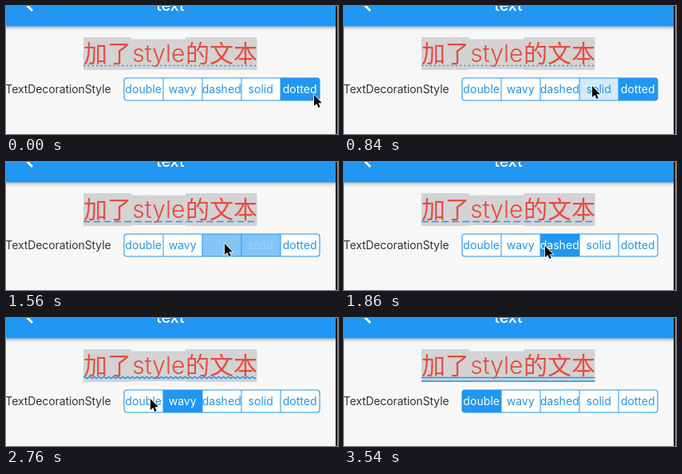
These frames come from a looping animation (416x160 px, 3600 ms). An HTML page:

```html
<!DOCTYPE html>
<html lang="en">
<head>
<meta charset="utf-8">
<title>Text decoration styles</title>
<style>
html, body { margin: 0; width: 100%; height: 100%; overflow: hidden; background: #f7f7f7; }
svg { display: block; width: 416px; height: 160px; font-family: Inter, Roboto, sans-serif; }
.sample { font: 350 30px Inter, "Noto Sans CJK SC", "Noto Sans CJK", sans-serif; fill: #ea4a3f; }
.cjk { font-family: "Noto Sans CJK SC", "Noto Sans CJK", sans-serif; }
.small { font-size: 14px; letter-spacing: .05px; }
.line { fill: none; stroke: #2196f3; stroke-width: 1.5; }
</style>
</head>
<body>
<svg viewBox="0 0 416 160">
  <defs>
    <linearGradient id="shade" x2="0" y2="1">
      <stop offset="0" stop-color="#000" stop-opacity=".3"/>
      <stop offset=".4" stop-color="#000" stop-opacity=".1"/>
      <stop offset="1" stop-color="#000" stop-opacity="0"/>
    </linearGradient>
    <clipPath id="pill"><rect x="148" y="90" width="245" height="28" rx="3.5"/></clipPath>
  </defs>
  <rect width="416" height="160" fill="#f7f7f7"/>
  <rect y="25.5" width="413" height="6" fill="url(#shade)"/>
  <rect width="413" height="25.5" fill="#2196f3"/>
  <path d="M33 6 L23 -4 L33 -14" fill="none" stroke="#fff" stroke-width="2.8"/>
  <text x="206" y="6" text-anchor="middle" font-size="19.5" font-weight="500" fill="#fff">text</text>

  <path d="M97 39H157V41.5H225V39H314.5V80H225V79H157V80H97Z" fill="#d3d3d3"/>
  <g class="sample">
    <text class="cjk" x="97" y="70">加了</text>
    <text x="191.3" y="70" text-anchor="middle">style</text>
    <text class="cjk" x="225" y="70">的文本</text>
  </g>
  <g id="lines" class="line"></g>

  <text x="131.5" y="109" text-anchor="end" font-size="14" letter-spacing="-.1" fill="#333">TextDecorationStyle</text>
  <g id="cells" clip-path="url(#pill)"></g>
  <path d="M197 90V118M246 90V118M295 90V118M344 90V118" stroke="#2196f3"/>
  <rect x="148" y="90" width="245" height="28" rx="3.5" fill="none" stroke="#2196f3" stroke-width="1.1"/>
  <g id="labels" class="small" text-anchor="middle"></g>

  <rect x="413" width="2" height="160" fill="#1c1c1c"/>
  <rect x="415" width="1" height="160" fill="#888"/>
  <path id="cursor" d="M0 0V14L3.2 11 5.5 16 7.7 15 5.5 10.2H9.8Z" fill="#000" stroke="#fff" stroke-width="1.4" paint-order="stroke"/>
</svg>
<script>
const LOOP = 3600, STEP = 60, FADE = 165, PRESS = 85;
const names = ['double', 'wavy', 'dashed', 'solid', 'dotted'];
const picks = [[-999, 4], [885, 3], [1488, 2], [2127, 1], [2895, 0]];
// time, x, y of the pointer tip
const route = [
  [0, 386, 111], [540, 335, 99], [600, 335, 99], [840, 311, 100], [1140, 309.5, 100],
  [1420, 275, 102], [1560, 274, 102], [1680, 270, 103], [2040, 234, 107],
  [2160, 232, 107], [2280, 230, 107], [2700, 182, 101], [2760, 181, 101],
  [2880, 181, 102], [3180, 190, 164], [LOOP, 190, 164]
];

const $ = id => document.getElementById(id);
const clamp = v => Math.min(1, Math.max(0, v));
const lerp = (a, b, p) => a + (b - a) * p;
const tint = p => `rgb(${[33, 150, 243].map(c => Math.round(lerp(255, c, p)))})`;

function add(parent, tag, attrs, text = '') {
  const el = document.createElementNS('http://www.w3.org/2000/svg', tag);
  for (const key in attrs) el.setAttribute(key, attrs[key]);
  el.textContent = text;
  return parent.appendChild(el);
}

const straight = 'M97 74.5H314.5';
const lines = [
  { d: 'M97 74.5H314.5M97 79H314.5' },
  { d: 'M97 74.5' + 'q1.5 -2.2 3 0q1.5 2.2 3 0'.repeat(36) },
  { d: straight, 'stroke-dasharray': '8.57 4.28' },
  { d: straight },
  { d: straight, 'stroke-dasharray': '2.14 3.21' }
].map(attrs => add($('lines'), 'path', attrs));

const cells = names.map((_, i) => add($('cells'), 'rect', { x: 148 + 49 * i, y: 90, width: 49, height: 28 }));
const labels = names.map((name, i) => add($('labels'), 'text', { x: 172.2 + 49 * i, y: 109 }, name));

function pointer(t) {
  const k = route.findIndex(point => point[0] > t);
  const [t0, x0, y0] = route[k - 1], [t1, x1, y1] = route[k];
  const p = (t - t0) / (t1 - t0), e = p * p * (3 - 2 * p);
  return [lerp(x0, x1, e), lerp(y0, y1, e)];
}

function draw(t) {
  const n = picks.filter(pick => pick[0] <= t).length - 1;
  const [start, current] = picks[n];
  const previous = n ? picks[n - 1][1] : -1;
  const next = picks[n + 1];
  const p = clamp((t - start) / FADE);

  names.forEach((_, i) => {
    let fill = 0, ink = 1;
    if (i === current) { fill = lerp(.2, 1, p); ink = 1 - p; }
    else if (i === previous) { fill = 1 - p; ink = p; }
    if (next && i === next[1] && t > next[0] - PRESS) fill = .2;
    cells[i].setAttribute('fill', tint(fill));
    labels[i].setAttribute('fill', tint(ink));
    lines[i].setAttribute('visibility', i === current ? 'visible' : 'hidden');
  });
  $('cursor').setAttribute('transform', `translate(${pointer(t)})`);
}

const origin = performance.now();
function tick() {
  const t = (performance.now() - origin) % LOOP;
  draw(Math.floor(t / STEP) * STEP);
  requestAnimationFrame(tick);
}
tick();
</script>
</body>
</html>
```
